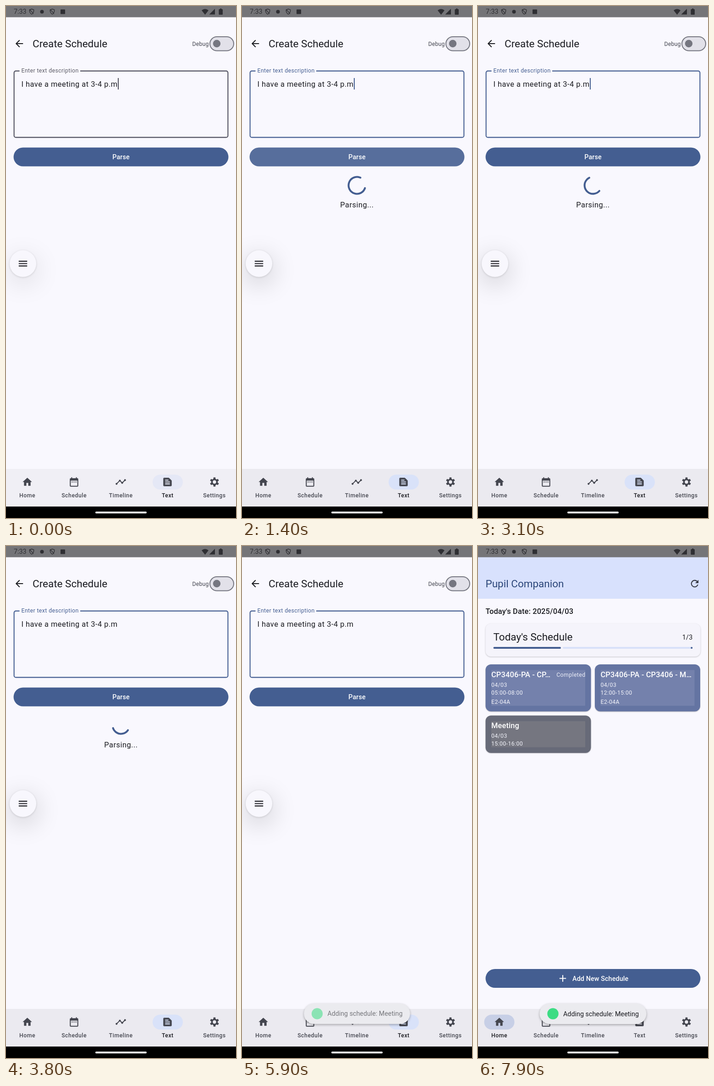
Recreate the animation shown at these times as an HTML page with a canvas. Size 502 by 1116 pixels, loop 8000 ms.

```html
<!DOCTYPE html>
<html lang="en">
<head>
<meta charset="utf-8">
<style>
html, body { margin: 0; width: 100%; height: 100%; overflow: hidden; background: #faf8ff; }
canvas { display: block; }
</style>
</head>
<body>
<canvas id="stage" width="502" height="1116"></canvas>
<script>
const c = document.getElementById('stage').getContext('2d');
const LOOP = 8000;
const SPIN_START = 920, RESULTS = 4000, ACCEPTED = 5640, TOAST = 5695, GO_HOME = 7400;
const BG = '#f9f8fe', BLUE = '#445e91', INK = '#1a1b20', GREY = '#44464f', PALE = '#d9e2f9';

const clamp = v => Math.max(0, Math.min(1, v));
const ramp = (t, start, length) => clamp((t - start) / length);

function bezier(x1, y1, x2, y2) {
  const at = (a, b, u) => 3 * a * u * (1 - u) ** 2 + 3 * b * u * u * (1 - u) + u ** 3;
  return x => {
    let lo = 0, hi = 1;
    for (let i = 0; i < 24; i++) {
      const mid = (lo + hi) / 2;
      if (at(x1, x2, mid) < x) lo = mid; else hi = mid;
    }
    return at(y1, y2, (lo + hi) / 2);
  };
}
const standard = bezier(.4, 0, .2, 1);
const settle = bezier(0, 0, 0, 1);

function text(s, x, y, size, color, { weight = 400, gap = 0, align = 'left' } = {}) {
  c.font = `${weight} ${size}px Roboto, sans-serif`;
  c.letterSpacing = gap + 'px';
  c.textAlign = align;
  c.fillStyle = color;
  c.fillText(s, x, y);
}

function box(x, y, w, h, r, fill) {
  c.beginPath();
  c.roundRect(x, y, w, h, r);
  c.fillStyle = fill;
  c.fill();
}

function dot(x, y, r, fill) {
  c.beginPath();
  c.arc(x, y, r, 0, 7);
  c.fillStyle = fill;
  c.fill();
}

function shadow(color, blur, dy) {
  c.shadowColor = color;
  c.shadowBlur = blur;
  c.shadowOffsetY = dy;
}

function layer(alpha, draw) {
  if (alpha <= 0) return;
  c.save();
  c.globalAlpha *= alpha;
  draw();
  c.restore();
}

// Icons live on a 24-unit grid centred on the given point.
function onGrid(x, y, size, draw) {
  c.save();
  c.translate(x - size / 2, y - size / 2);
  c.scale(size / 24, size / 24);
  draw();
  c.restore();
}

const paths = {
  home: 'M10 20v-6h4v6h5v-8h3L12 3 2 12h3v8z',
  back: 'M20 11H7.8l5.6-5.6L12 4l-8 8 8 8 1.4-1.4L7.8 13H20z',
  text: 'M20.4 8.4l-4.8-4.8Q15 3 14.2 3H5Q3 3 3 5v14q0 2 2 2h14q2 0 2-2V9.8q0-.8-.6-1.4zM7 7h7v2H7zM17 17H7v-2h10zM17 13H7v-2h10z',
  schedule: 'M19 4h-1V2h-2v2H8V2H6v2H5Q3 4 3 6v14q0 2 2 2h14q2 0 2-2V6q0-2-2-2zM19 20H5V9h14zM7 11h2v2H7zM11 11h2v2h-2zM15 11h2v2h-2z',
  tick: 'M10 17l-5-5 1.4-1.4 3.6 3.6 7.6-7.6L19 8z',
  close: 'M19 6.4L17.6 5 12 10.6 6.4 5 5 6.4 10.6 12 5 17.6 6.4 19 12 13.4 17.6 19 19 17.6 13.4 12z',
  add: 'M19 13h-6v6h-2v-6H5v-2h6V5h2v6h6z',
  menu: 'M3 6h18v2H3zM3 11h18v2H3zM3 16h18v2H3z',
  refresh: 'M17.65 6.35A8 8 0 1 0 19.73 14h-2.08A6 6 0 1 1 16.22 7.78L13 11h7V4z'
};
for (const name in paths) paths[name] = new Path2D(paths[name]);

function icon(name, x, y, color, size = 24.6) {
  onGrid(x, y, size, () => {
    c.fillStyle = color;
    c.fill(paths[name], 'evenodd');
  });
}

function timelineIcon(x, y, color) {
  onGrid(x, y, 24.6, () => {
    const points = [[3, 16], [10, 9], [15, 14], [21, 8]];
    c.beginPath();
    points.forEach(p => c.lineTo(...p));
    c.strokeStyle = color;
    c.lineWidth = 1.9;
    c.stroke();
    points.forEach(p => dot(...p, 2, color));
  });
}

function gearIcon(x, y, color) {
  onGrid(x, y, 24.6, () => {
    c.translate(12, 12);
    c.beginPath();
    for (let i = 0; i < 6; i++) {
      const a = i * Math.PI / 3 + Math.PI / 6;
      for (const [off, r] of [[-.34, 7], [-.22, 9.9], [.22, 9.9], [.34, 7]]) {
        const q = a + off + Math.PI / 3;
        c.lineTo(r * Math.cos(q), r * Math.sin(q));
      }
    }
    c.closePath();
    c.moveTo(3.6, 0);
    c.arc(0, 0, 3.6, 0, Math.PI * 2);
    c.fillStyle = color;
    c.fill('evenodd');
  });
}

function shield(x) {
  c.beginPath();
  c.moveTo(x, 6.5);
  c.lineTo(x + 4.7, 8.3);
  c.quadraticCurveTo(x + 5, 15, x, 18);
  c.quadraticCurveTo(x - 5, 15, x - 4.7, 8.3);
  c.closePath();
  c.moveTo(x - 4, 8);
  c.lineTo(x + 4, 17);
  c.strokeStyle = '#333337';
  c.lineWidth = 1.4;
  c.stroke();
}

function statusBar() {
  const ink = '#2f2f33';
  c.fillStyle = '#757578';
  c.fillRect(0, 0, 502, 24.5);
  text('7:33', 17, 17.3, 14.3, ink);
  shield(56);
  shield(101);
  dot(78.5, 12.5, 4, ink);
  box(119, 7.5, 10, 10, 1, ink);
  c.beginPath();
  c.moveTo(434.5, 19);
  c.lineTo(427, 9.5);
  c.quadraticCurveTo(434.5, 3.5, 442, 9.5);
  c.closePath();
  c.moveTo(456, 6);
  c.lineTo(456, 18.5);
  c.lineTo(443.5, 18.5);
  c.closePath();
  c.fill();
  box(464.5, 7, 8.5, 12, 1.2, ink);
  c.fillRect(467, 5.5, 3.5, 2);
}

function button(y, label, x = 251, align = 'center') {
  box(16.5, y, 469, 41, 20.5, BLUE);
  text(label, x, y + 25.5, 14.35, '#fff', { weight: 500, gap: .1, align });
}

function spinner(t) {
  const time = t - SPIN_START, cycle = 1332, half = cycle / 2;
  const turn = Math.floor(time / cycle), phase = time % cycle;
  const head = 290 * standard(ramp(phase, 0, half));
  const tail = 290 * standard(ramp(phase, half, half));
  const start = -90 + 216 * turn + 286 * phase / cycle + tail + 5.7;
  const rad = Math.PI / 180;
  c.beginPath();
  c.arc(251, 391, 18.4, start * rad, (start + Math.max(.1, head - tail)) * rad);
  c.strokeStyle = BLUE;
  c.lineWidth = 4.1;
  c.lineCap = 'round';
  c.stroke();
  c.lineCap = 'butt';
  text('Parsing...', 251, 438.5, 16.4, INK, { gap: .5, align: 'center' });
}

function results() {
  text('Parsing Results', 16.5, 402.5, 16.4, INK, { weight: 500, gap: .15 });
  box(16.5, 419.5, 469, 153.5, 12, '#e2e1e8');
  text('Meeting', 33.5, 451.5, 16.4, INK, { weight: 500, gap: .15 });
  text('2025-04-03 15:00 - 2025-04-03 16:00', 33.5, 473.5, 14.35, GREY, { gap: .25 });
  text('Category: MEETING • Priority: MEDIUM', 33.5, 494, 12.3, GREY, { gap: .4 });
  dot(394, 531, 10.3, BLUE);
  icon('tick', 394, 531, '#e2e1e8');
  icon('close', 444, 531, '#b3211e');
  button(922, 'Accept All');
}

function createPage(t) {
  const focused = t >= 100;
  const outline = focused ? BLUE : '#51515f';
  icon('back', 29, 82, INK);
  text('Create Schedule', 58, 90, 22.5, INK);
  text('Debug', 406.5, 87, 12.3, GREY, { gap: .2 });
  box(445, 67, 52, 30.5, 15.3, '#e2e1e9');
  c.strokeStyle = '#757680';
  c.lineWidth = 2;
  c.stroke();
  dot(460, 82, 8.2, '#757680');

  c.beginPath();
  c.roundRect(17.6, 141.6, 466.8, 144.8, 4);
  c.strokeStyle = outline;
  c.lineWidth = 2.1;
  c.stroke();
  c.fillStyle = BG;
  c.fillRect(29.5, 138, 132.5, 6);
  text('Enter text description', 33.5, 145, 12.3, focused ? BLUE : '#5b5b66', { gap: .4 });
  text('I have a meeting at 3-4 p.m', 33.5, 175.5, 16.4, INK, { gap: .5 });
  if (t % 1000 < 500) {
    c.fillStyle = outline;
    c.fillRect(244, 157, 2, 25);
  }

  button(308.5, 'Parse');
  const ripple = ramp(t, 820, 120) * (1 - ramp(t, 1450, 250));
  layer(.1 * ripple, () => box(16.5, 308.5, 469, 41, 20.5, '#fff'));

  if (t >= SPIN_START && t < RESULTS) spinner(t);
  if (t >= RESULTS && t < ACCEPTED) results();

  c.save();
  shadow(focused ? 'rgba(0,0,0,.2)' : 'rgba(0,0,0,.13)', 56, 14);
  dot(37, 561.5, 29, '#f8f7fd');
  shadow('rgba(0,0,0,.14)', 4, 1);
  dot(37, 561.5, 29, '#f8f7fd');
  c.restore();
  icon('menu', 37, 561.5, INK);
}

function card(x, y, h, title, lines, outer, inner) {
  c.save();
  shadow('rgba(0,0,0,.25)', 2, 1);
  box(x, y, 230, h, 12, outer);
  c.restore();
  c.fillStyle = inner;
  c.fillRect(x + 12.5, y + 12.3, 205, h - 24.6);
  text(title, x + 12.5, y + 27.5, 16.4, '#fff', { weight: 500, gap: .15 });
  lines.forEach((s, i) => text(s, x + 12.5, y + [48.5, 65.5, 86][i], 12.3, '#f2f3fa', { gap: .4 }));
}

function homePage() {
  c.fillStyle = BG;
  c.fillRect(0, 24, 502, 985);
  c.fillStyle = '#d8e1fd';
  c.fillRect(0, 24, 502, 91);
  text('Pupil Companion', 16.5, 90, 22.5, '#2b4678');
  icon('refresh', 473, 82, '#383b45');
  text("Today's Date: 2025/04/03", 16.5, 147.5, 16.4, INK, { weight: 500, gap: .15 });

  c.save();
  shadow('rgba(0,0,0,.22)', 3, 1);
  box(16.5, 169, 469, 72, 12, '#f5f4fb');
  c.restore();
  text("Today's Schedule", 33.5, 206, 22.5, INK);
  text('1/3', 468.5, 203.5, 14.35, INK, { gap: .25, align: 'right' });
  box(33.5, 220, 147.5, 4, 2, BLUE);
  box(185, 220, 283.5, 4, 2, '#d8e1f9');
  dot(466.3, 222, 2, BLUE);

  card(16.5, 258, 102.5, 'CP3406-PA - CP…', ['04/03', '05:00-08:00', 'E2-04A'], '#6474a2', '#7481ac');
  text('Completed', 234.5, 284.5, 12.3, '#eceef8', { gap: .4, align: 'right' });
  card(255, 258, 102.5, 'CP3406-PA - CP3406 - M…', ['04/03', '12:00-15:00', 'E2-04A'], '#6474a2', '#7481ac');
  card(16.5, 369.5, 81.5, 'Meeting', ['04/03', '15:00-16:00'], '#676a78', '#757680');

  button(922, 'Add New Schedule', 206, 'left');
  icon('add', 185, 942.5, '#fff');
}

function navBar(t) {
  const first = t < 100;
  const atHome = t >= GO_HOME;
  const grow = standard(ramp(t, GO_HOME, 150));
  c.fillStyle = first ? '#f0eff5' : '#ebeaf0';
  c.fillRect(0, 1009, 502, 82);

  const pill = (x, amount, fill) => layer(amount, () =>
    box(x - 33 * amount, 1021.5, 66 * amount, 32.5, 16.3, fill));
  pill(353, 1 - grow, first ? '#e5e8f6' : PALE);
  pill(46.5, grow, '#c7cfe6');

  icon('home', 46.5, 1037.5, GREY);
  icon('schedule', 148.5, 1037.5, GREY);
  timelineIcon(250.5, 1037.5, GREY);
  icon('text', 352.5, 1037.5, GREY);
  gearIcon(455, 1037.5, GREY);
  ['Home', 'Schedule', 'Timeline', 'Text', 'Settings'].forEach((label, i) => {
    const active = i === (atHome ? 0 : 3);
    text(label, 46.5 + i * 102.1, 1070.5, 12.3, active ? INK : GREY, { weight: 500, gap: .5, align: 'center' });
  });

  c.fillStyle = '#000';
  c.fillRect(0, 1091, 502, 25);
  box(195, 1102, 112, 4, 2, '#fff');
}

function toast(t) {
  const scale = .9 + .1 * settle(ramp(t, TOAST, 333));
  layer(ramp(t, TOAST, 66), () => {
    c.translate(251, 1019.5);
    c.scale(scale, scale);
    c.translate(-251, -1019.5);
    c.save();
    shadow('rgba(0,0,0,.3)', 5, 2);
    box(134.5, 997, 233, 45, 22.5, '#ebebef');
    c.restore();
    layer(ramp(t, TOAST + 50, 283), () => {
      dot(163.5, 1019.5, 12.2, '#3ddc84');
      text('Adding schedule: Meeting', 186, 1024.5, 14.35, INK);
    });
  });
}

function draw(t) {
  c.fillStyle = BG;
  c.fillRect(0, 0, 502, 1116);
  createPage(t);
  layer(standard(ramp(t, GO_HOME, 400)), homePage);
  statusBar();
  navBar(t);
  toast(t);
}

function tick() {
  draw(performance.now() % LOOP);
  requestAnimationFrame(tick);
}
tick();
</script>
</body>
</html>
```
